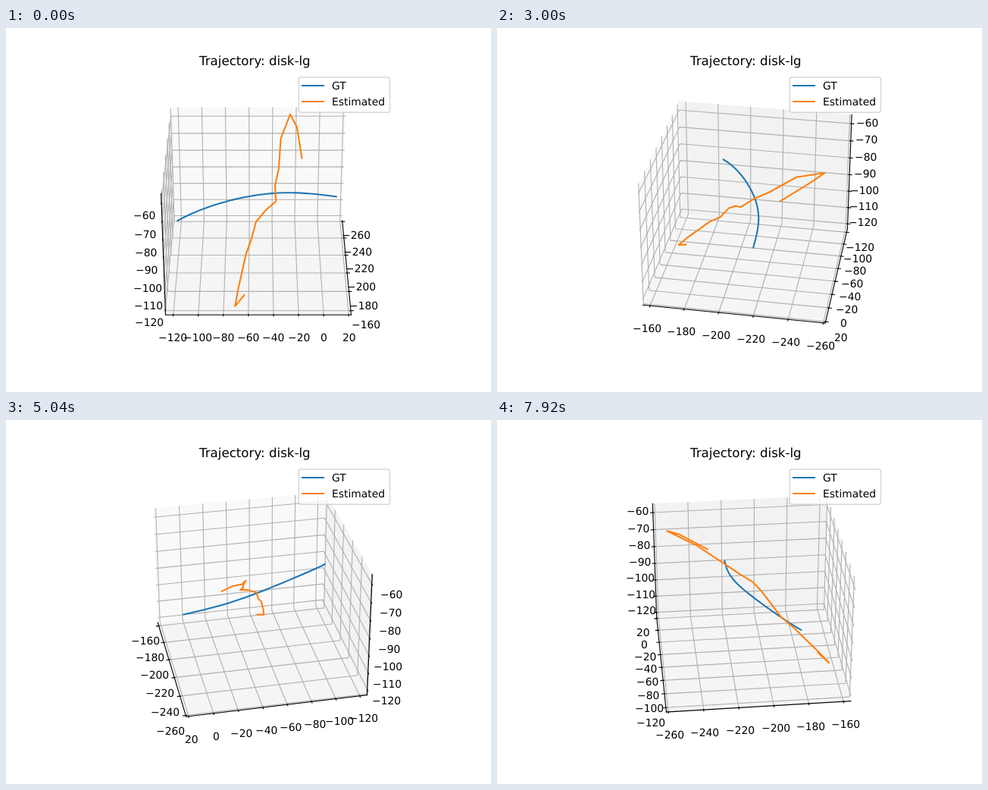
Animation of 640x480 px, one loop 8 s. Source, as an HTML page with a canvas:

```html
<!DOCTYPE html>
<html lang="en">
<head>
<meta charset="utf-8">
<title>Trajectory</title>
<style>
  html, body { margin: 0; width: 100%; height: 100%; overflow: hidden; background: #fff; }
  canvas { display: block; width: 640px; height: 480px; }
</style>
</head>
<body>
<canvas id="plot" width="640" height="480"></canvas>
<script>
const ctx = document.getElementById('plot').getContext('2d');
const LOOP = 8000, STEP = 120, DEGREES_PER_STEP = 4;
const CENTER = { x: 333, y: 237.4 }, DISTANCE = 1997.84;
const SIN_ELEV = 0.5, COS_ELEV = Math.sqrt(3) / 2;
const SIDE = 118.92;                       // half width of the box, in pixels at its centre
const HALF = [SIDE, SIDE, SIDE * 0.75];
const FONT = '"DejaVu Sans", sans-serif';
const THIN = 1.11, THICK = 2.08;
const BLUE = '#1f77b4', ORANGE = '#ff7f0e';

const AXES = [
  { min: -261.15, max: -155.8, step: 20, pane: '#f9f9f9' },
  { min: -126.2, max: 22, step: 20, pane: '#f2f2f2' },
  { min: -123.08, max: -54.85, step: 10, pane: '#f5f5f5' }
];

// Both paths are in box pixels, measured from the centre.
// The true path is a smooth arc over t from -1 to 1.
const TRUTH = Array.from({ length: 25 }, (_, n) => {
  const t = n / 12 - 1;
  return [
    -7.1 + t * (-41 + t * (22.7 + t * (8 - 6 * t * t))),
    103.8 * t,
    15.9 + t * (-6.5 + t * (-7.5 + 2.1 * t))
  ];
});

// Corners of the estimated path
const ESTIMATE = [
  [91, -18, -77], [104, -30, -86], [89, -26, -69], [57, -16, -36], [41, -9, -23],
  [28, -3, -4.5], [17, 10, 7], [7, 23, 14], [-11, 22, 28], [-31, 27, 42],
  [-66, 30, 69], [-104, 43, 86], [-87, 52, 75], [-50, 58, 48]
];

let sinAz = 0, cosAz = 1;

function project([x, y, z]) {
  const toward = x * cosAz + y * sinAz;
  const depth = 1 - (COS_ELEV * toward + SIN_ELEV * z) / DISTANCE;
  return [
    CENTER.x + (y * cosAz - x * sinAz) / depth,
    CENTER.y - (COS_ELEV * z - SIN_ELEV * toward) / depth
  ];
}

// Copy of a point with one coordinate replaced
function moved(point, axis, value) {
  const copy = point.slice();
  copy[axis] = value;
  return copy;
}

// Copy of a point carried across the box along one axis
const across = (point, axis) => moved(point, axis, -point[axis]);

function trace(points) {
  ctx.beginPath();
  points.forEach(p => ctx.lineTo(...project(p)));
}

function line(points, color, width, cap = 'butt') {
  trace(points);
  ctx.strokeStyle = color;
  ctx.lineWidth = width;
  ctx.lineCap = cap;
  ctx.lineJoin = 'round';
  ctx.stroke();
}

function text(str, x, baseline, size, centered) {
  ctx.font = `${size}px ${FONT}`;
  ctx.textRendering = 'geometricPrecision';
  ctx.fillStyle = '#000';
  const left = centered ? x - ctx.measureText(str).width / 2 : x;
  ctx.fillText(str, Math.round(left), Math.round(baseline));
}

function eachTick(i, draw) {
  const { min, max, step } = AXES[i];
  for (let v = Math.ceil(min / step) * step; v <= max; v += step)
    draw(((v - min) / (max - min) * 2 - 1) * HALF[i], v);
}

function drawPane(i, back) {
  const j = (i + 1) % 3, k = (i + 2) % 3;
  const side = across(back, j);
  trace([back, side, across(side, k), across(back, k)]);
  ctx.closePath();
  ctx.fillStyle = AXES[i].pane;
  ctx.fill();
}

function drawGrid(i, back) {
  eachTick(i, at => {
    const corner = moved(back, i, at);
    line([across(corner, (i + 1) % 3), corner, across(corner, (i + 2) % 3)], '#b0b0b0', THIN);
  });
}

function drawAxis(i, back) {
  const dir = i === 0 ? 1 : 0;             // the ticks point along this axis
  const edge = across(back, dir);
  line([edge, across(edge, i)], '#000', THIN, 'square');
  eachTick(i, (at, value) => {
    const p = moved(edge, i, at);
    line([moved(p, dir, p[dir] * 1.032), moved(p, dir, p[dir] * 0.984)], '#000', THIN);
    const [x, y] = project(p.map((c, n) => n === i ? c : c * 1.166));
    text(String(value).replace('-', '\u2212'), x, y + 10.7, 13.89, true);
  });
}

function drawLegend() {
  ctx.beginPath();
  ctx.roundRect(386.3, 65, 120.2, 46.2, 2.8);
  ctx.fillStyle = 'rgba(255,255,255,.8)';
  ctx.fill();
  ctx.strokeStyle = 'rgba(204,204,204,.8)';
  ctx.lineWidth = 1.39;
  ctx.stroke();
  [['GT', BLUE], ['Estimated', ORANGE]].forEach(([name, color], row) => {
    const y = 76 + 21 * row;
    ctx.fillStyle = color;
    ctx.fillRect(390, y - 1, 30, 2);
    text(name, 430, y + 5, 13.89);
  });
}

function draw(step) {
  const azimuth = step * DEGREES_PER_STEP * Math.PI / 180;
  sinAz = Math.sin(azimuth);
  cosAz = Math.cos(azimuth);
  // The corner of the floor farthest from the viewer
  const back = [cosAz < 0 ? SIDE : -SIDE, sinAz < 0 ? SIDE : -SIDE, -HALF[2]];

  ctx.fillStyle = '#fff';
  ctx.fillRect(0, 0, 640, 480);
  for (const part of [drawPane, drawGrid, drawAxis])
    AXES.forEach((_, i) => part(i, back));
  line(TRUTH, BLUE, THICK, 'square');
  line(ESTIMATE, ORANGE, THICK, 'square');
  text('Trajectory: disk-lg', 328, 49, 16.67, true);
  drawLegend();
}

let start = null, shown = -1;
function tick(now) {
  start ??= now;
  const step = Math.floor(((now - start) % LOOP) / STEP);
  if (step !== shown) draw(shown = step);
  requestAnimationFrame(tick);
}
draw(0);
requestAnimationFrame(tick);
</script>
</body>
</html>
```
